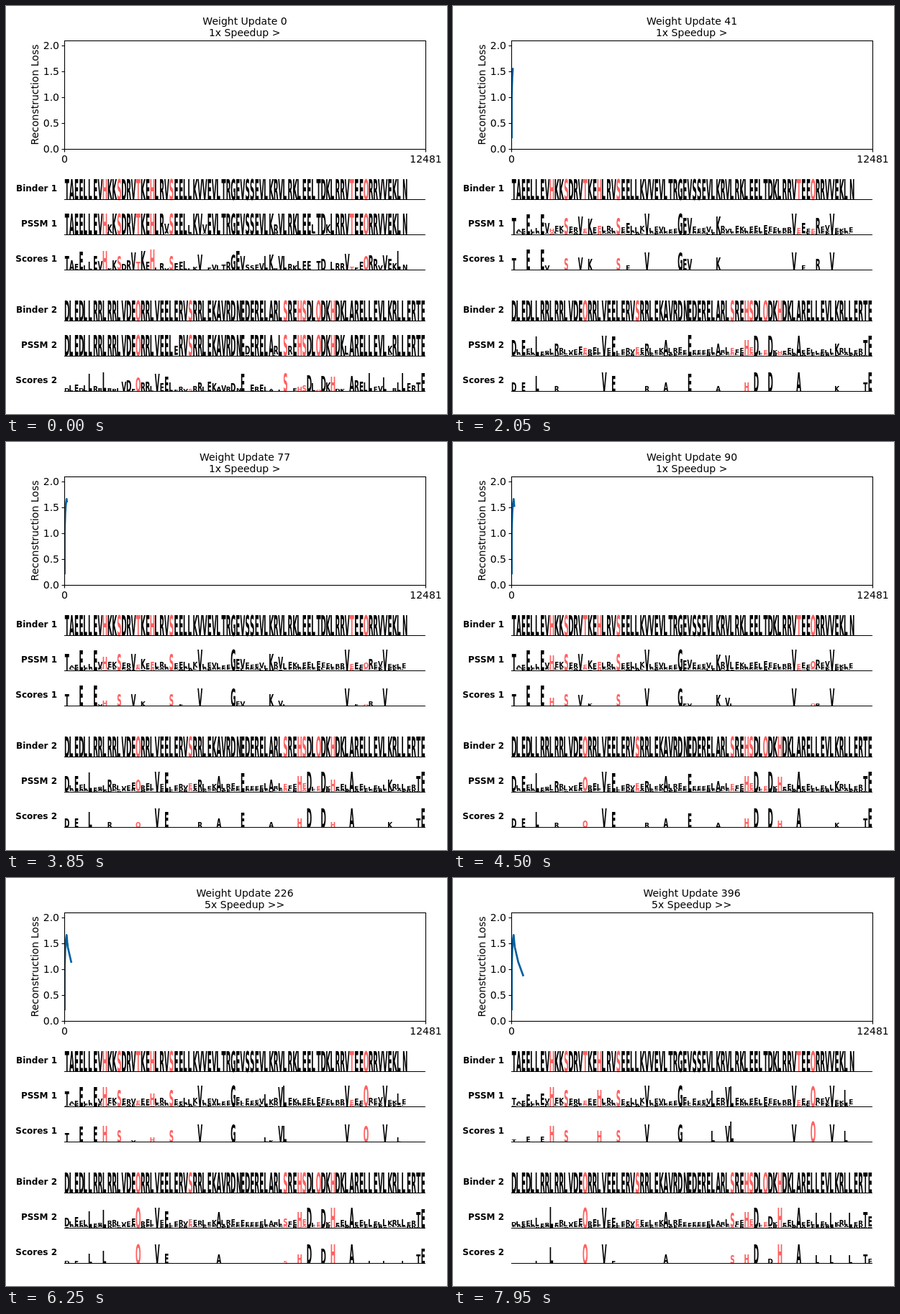
An HTML page with a canvas that plays this animation: 613 by 568 pixels, repeating every 8000 ms.

```html
<!DOCTYPE html>
<html lang="en">
<head>
<meta charset="utf-8">
<title>Sequence logos during training</title>
<style>
html, body { margin: 0; width: 100%; height: 100%; overflow: hidden; background: #fff; }
canvas { display: block; }
</style>
</head>
<body>
<canvas id="stage" width="613" height="568"></canvas>
<script>
const ctx = document.getElementById('stage').getContext('2d');
const FAMILY = '"DejaVu Sans", sans-serif';
const LOOP = 8000, STEP = 50;
const RED = '#ff6060', BLUE = '#0060a0';
const LEFT = 81.5, RIGHT = 583.5, TOP = 48.5, BOTTOM = 199.5;
const CELL = 6.6, ROW = 29, UNIT = 72, LAST = 12481;

// Score of a residue over the update count n.
const hold = peak => () => peak;
const fade = (peak, mid) => n => peak / (1 + (n / mid) ** 4);
const rise = (peak, mid) => n => peak - fade(peak, mid)(n);

// trends: score rule, then the positions that follow it (all others stay at zero)
const BINDERS = [
  {
    y: 269.5,
    seq: 'TAEELLEVHKKSDRVTKEHLRVSEELLKVVEVLTRGEVSSEVLKRVLRKLEELTDKLRRVTEEORRVVEKLN',
    marked: [8, 11, 15, 18, 22, 60, 63],
    trends: [
      [hold(0.85), 28, 35, 59, 67],
      [hold(0.6), 11, 22],
      [fade(0.98, 310), 3, 6],
      [fade(0.6, 280), 0],
      [fade(0.65, 130), 14, 43],
      [fade(0.62, 65), 16, 36, 37, 64],
      [fade(0.22, 70), 7, 24, 61],
      [rise(0.8, 90), 8, 45],
      [rise(0.98, 150), 46, 63],
      [rise(0.6, 250), 18, 42, 70]
    ]
  },
  {
    y: 438.5,
    seq: 'DLEDLLRRLRRLVDEORRLVEELERVSRRLEKAVRDNEDERELARLSREHSDLODKHDKLARELLEVLKRLLERTE',
    marked: [15, 26, 46, 49, 50, 53, 56],
    trends: [
      [hold(0.92), 19, 51, 60],
      [hold(0.45), 32, 49, 74],
      [fade(0.95, 290), 54, 75],
      [fade(0.75, 270), 5, 21],
      [fade(0.45, 190), 0, 2],
      [fade(0.85, 120), 37],
      [fade(0.26, 150), 9, 28, 43, 68],
      [rise(0.95, 100), 15, 56],
      [rise(0.85, 170), 8],
      [rise(0.6, 330), 46, 64, 67, 71]
    ]
  }
];

// Update count and reconstruction loss
const LOSS = [
  [1, 0.23], [2, 1.05], [21, 1.38], [40, 1.55], [70, 1.67],
  [95, 1.5], [111, 1.43], [226, 1.15], [396, 0.89]
];

const lerp = (a, b, w) => a + (b - a) * w;

function lossAt(n) {
  const i = LOSS.findIndex(([k]) => k >= n);
  if (i < 1) return LOSS[i ? LOSS.length - 1 : 0][1];
  const [x0, y0] = LOSS[i - 1], [x1, y1] = LOSS[i];
  return lerp(y0, y1, (n - x0) / (x1 - x0));
}

function noise(a, b) {
  const v = Math.sin(a * 12.9898 + b * 78.233) * 43758.5453;
  return v - Math.floor(v);
}

// Weaker residues of a column, smallest first.
function weakResidues(letter, r) {
  const pool = 'KREALEKR';
  const pick = k => pool[Math.floor(r(k) * pool.length)];
  let top = 'E';
  if ('LVA'.includes(letter)) top = r(1) > 0.35 ? letter : 'L';
  else if ('RK'.includes(letter)) top = r(1) > 0.5 ? letter : 'E';
  return [
    [pick(2), 0.03 + 0.04 * r(3)],
    [pick(4), 0.06 + 0.05 * r(5)],
    [top, 0.12 + 0.18 * r(6)]
  ];
}

BINDERS.forEach((binder, b) => {
  binder.cols = [...binder.seq].map((letter, i) => {
    const r = k => noise(i + 1, b * 9 + k);
    const trend = binder.trends.find(([, ...at]) => at.includes(i));
    const score = trend ? trend[0] : hold(0);
    const strong = Math.max(score(0), score(LAST)) > 0.55;
    return {
      letter, score,
      color: binder.marked.includes(i) ? RED : '#000',
      start: strong ? 0.65 + 0.33 * r(7) : 0.55 * r(7),
      weak: weakResidues(letter, r)
    };
  });
});

const SHIFT = { N: 1.4, L: -1 };

function glyph(letter, i, base, height, color) {
  if (height < 0.015) return;
  ctx.save();
  ctx.translate(LEFT + (i + 0.5) * CELL + (SHIFT[letter] || 0), base);
  ctx.scale(1.35 * CELL / 100, height * ROW / 72.9);
  ctx.fillStyle = color;
  ctx.fillText(letter, 0, 0);
  ctx.restore();
}

function drawStack(col, i, base, p) {
  const parts = col.weak.map(([letter, h]) => [letter, h * Math.min(1, 1.15 * (1 - p))]);
  if (p > parts[2][1]) parts[2] = [col.letter, p];
  parts.sort((a, b) => a[1] - b[1]);
  let y = base;
  for (const [letter, h] of parts) {
    glyph(letter, i, y, h, col.color);
    y -= h * ROW;
  }
}

function drawBinder(binder, n, number) {
  // The initial logo dissolves as the loss jumps up.
  const w = Math.min(1, (lossAt(Math.min(n, 21)) - 0.23) / 1.15);
  const rows = [binder.y, binder.y + 49, binder.y + 98];

  ctx.font = 'bold 100px ' + FAMILY;
  ctx.textAlign = 'center';
  binder.cols.forEach((col, i) => {
    const score = col.score(n);
    const before = col.start < 0.1 ? 0.42 : 0.99;
    glyph(col.letter, i, rows[0], 1, col.color);
    drawStack(col, i, rows[1], lerp(before, Math.min(1, 1.06 * Math.sqrt(score)), w));
    glyph(col.letter, i, rows[2], lerp(col.start, score, w), col.color);
  });

  ['Binder', 'PSSM', 'Scores'].forEach((name, r) => {
    ctx.fillStyle = '#000';
    ctx.fillRect(81, rows[r] - 0.5, 502, 1);
    text(`${name} ${number}`, 71, rows[r] - 11.5, 'right', 'bold 12px ');
  });
}

function text(str, x, y, align, font = '14px ') {
  ctx.font = font + FAMILY;
  ctx.textAlign = align;
  ctx.fillStyle = '#000';
  ctx.fillText(str, x, y);
}

function line(x0, y0, x1, y1) {
  ctx.beginPath();
  ctx.moveTo(x0, y0);
  ctx.lineTo(x1, y1);
  ctx.stroke();
}

function drawCurve(n) {
  if (n < 2) return;
  const x = v => LEFT + v * (RIGHT - LEFT) / LAST;
  const y = v => BOTTOM - v * UNIT;
  ctx.save();
  ctx.beginPath();
  ctx.rect(LEFT, TOP, RIGHT - LEFT, BOTTOM - TOP);
  ctx.clip();
  ctx.beginPath();
  for (const [k, loss] of LOSS) if (k < n) ctx.lineTo(x(k), y(loss));
  ctx.lineTo(x(n), y(lossAt(n)));
  ctx.strokeStyle = BLUE;
  ctx.lineWidth = 2.7;
  ctx.lineJoin = 'round';
  ctx.lineCap = 'square';
  ctx.stroke();
  ctx.restore();
}

function drawChart(n) {
  drawCurve(n);
  ctx.strokeStyle = '#000';
  ctx.lineWidth = 1.1;
  ctx.strokeRect(LEFT, TOP, RIGHT - LEFT, BOTTOM - TOP);
  for (let v = 0; v <= 2; v += 0.5) {
    const y = BOTTOM - v * UNIT;
    line(LEFT - 4, y, LEFT, y);
    text(v.toFixed(1), 74, y + 4.5, 'right');
  }
  for (const [x, label] of [[LEFT, '0'], [RIGHT, String(LAST)]]) {
    line(x, BOTTOM, x, BOTTOM + 4);
    text(label, x, 218, 'center');
  }
  ctx.save();
  ctx.translate(44.5, 123.5);
  ctx.rotate(-Math.PI / 2);
  text('Reconstruction Loss', 0, 0, 'center');
  ctx.restore();
  text(`Weight Update ${n}`, 332, 26, 'center');
  text(n > 100 ? '5x Speedup >>' : '1x Speedup >', 331.7, 42, 'center');
}

function draw(step) {
  const n = step < 100 ? step : 101 + 5 * (step - 100);
  ctx.fillStyle = '#fff';
  ctx.fillRect(0, 0, 613, 568);
  drawChart(n);
  BINDERS.forEach((binder, i) => drawBinder(binder, n, i + 1));
}

let shown = -1, origin = null;
function tick(now) {
  if (origin === null) origin = now;
  const step = Math.floor(((now - origin) % LOOP) / STEP);
  if (step !== shown) draw(shown = step);
  requestAnimationFrame(tick);
}
draw(0);
requestAnimationFrame(tick);
</script>
</body>
</html>
```
